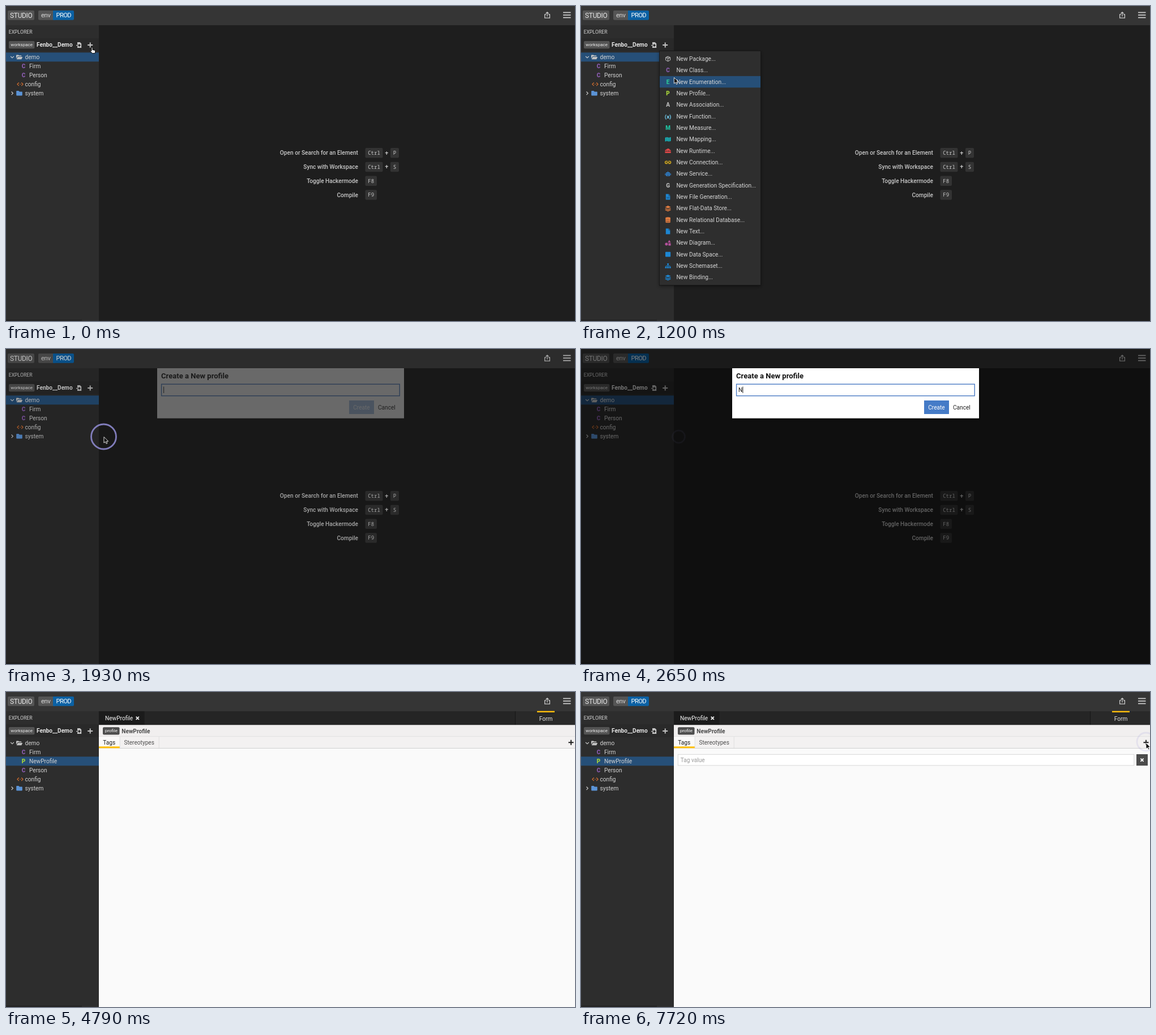
Animation of 1005 by 557 pixels, one loop 8000 ms. Source, as an HTML page:

```html
<!DOCTYPE html>
<html lang="en">
<head>
<meta charset="utf-8">
<title>Create a profile</title>
<style>
html, body { margin: 0; width: 100%; height: 100%; overflow: hidden; background: #1e1e1e; }
svg { display: block; width: 100vw; height: 100vh; }
text { font-family: Roboto, sans-serif; white-space: pre; }
.mono { font-family: "Noto Sans Mono", "DejaVu Sans Mono", monospace; }
</style>
</head>
<body>
<svg id="stage" viewBox="0 0 1005 557"></svg>
<script>
const LOOP = 8000, STEP = 80, SIZE = 10.15, SELECTED = '#264f78';

// Markup helpers
const rect = (x, y, w, h, fill, more = '') =>
  `<rect x="${x}" y="${y}" width="${w}" height="${h}" fill="${fill}" ${more}/>`;
const text = (s, x, y, fill, size = SIZE, weight = 400, more = '') =>
  `<text x="${x}" y="${y}" fill="${fill}" font-size="${size}" font-weight="${weight}" ${more}>${s}</text>`;
const path = (d, fill, more = '') => `<path d="${d}" fill="${fill}" ${more}/>`;
const line = (d, color, width = 1.2, more = '') =>
  `<path d="${d}" fill="none" stroke="${color}" stroke-width="${width}" ${more}/>`;
const group = (id, body, more = '') => `<g id="${id}" ${more}>${body}</g>`;
const place = (x, y, body) => `<g transform="translate(${x} ${y})">${body}</g>`;
const MIDDLE = 'text-anchor="middle"', END = 'text-anchor="end"', ROUND = 'rx="2"';

// Icons, drawn around 0,0
const letter = (s, size = 10) => c => text(s, 0, 3.6, c, size, 900, MIDDLE);
const cross = c => line('M-2.6-2.6L2.6 2.6M2.6-2.6L-2.6 2.6', c, 1.8);
const plus = c => line('M-4.5 0H4.5M0-4.5V4.5', c, 1.9);
const folder = c => path('M-5.3-3.4Q-5.3-4.2-4.5-4.2H-1L.3-2.9H4.5Q5.3-2.9 5.3-2.1V3.3Q5.3 4.1 4.5 4.1H-4.5Q-5.3 4.1-5.3 3.3Z', c);
const openFolder = c =>
  path('M-5.5 2.6V-3Q-5.5-3.9-4.7-3.9H-1.6L-.4-2.7H3.2Q4-2.7 4-1.2H-3Z', c) +
  path('M-2.7-.4H5.8L3.8 3.9H-4.8Z', c);
const tags = c => line('M-2.2-2.8L-5 0L-2.2 2.8M2.2-2.8L5 0L2.2 2.8M-1 0H-.2M.6 0H1.4', c, 1.2);
const cube = c => line('M0-4.4L4-2.3V2.3L0 4.4L-4 2.3V-2.3ZM-4-2.3L0-.2L4-2.3M0-.2V4.4M-2-3.4L2-1.3', c, 1);
const map = c => path('M-5-3L-2-4V3L-5 4ZM-1.4-4L1.4-3V4L-1.4 3ZM2-3L5-4V3L2 4Z', c);
const toolbox = c => path('M-5.2 0Q-5-2.4-2.6-2.6Q-1.6-4.4.6-4.2Q3-4 3.2-2Q5.2-1.6 5.2 0V.4H2V-.3H.6V.4H-2V-.3H-3V.4H-5.2ZM-5.2 1.2H5.2V4H-5.2Z', c);
const link = c =>
  line('M-.8-2.1H-2.9A2.1 2.1 0 0 0-2.9 2.1H-.8M.8-2.1H2.9A2.1 2.1 0 0 1 2.9 2.1H.8M-2.4 0H2.4', c, 1.4);
const robot = c => rect(-3.6, -2.6, 7.2, 6.6, c, 'rx="1.4"') + rect(-5.2, -.6, 1, 3, c) + rect(4.2, -.6, 1, 3, c) +
  rect(-.5, -4.4, 1, 2, c) + rect(-2.3, -.9, 1.5, 1.5, '#2d2d2d') + rect(.8, -.9, 1.5, 1.5, '#2d2d2d') + rect(-2, 2, 4, .8, '#2d2d2d');
const file = c => path('M-3.8-5H1.2V-2H3.8V5H-3.8ZM1.9-5L3.8-2.8H1.9Z', c);
const codeFile = c => file(c) + line('M-1.6 0V3M0 1V3M1.6-.6V3', '#20415c', .8);
const layers = c => path('M0-4.7L5-2.4L0-.1L-5-2.4Z', c) +
  line('M-4.8 .1L0 2.2L4.8 .1M-4.8 2.5L0 4.6L4.8 2.5', c, 1.3);
const database = c => path('M-4.4-3.3A4.4 1.7 0 0 1 4.4-3.3V-2A4.4 1.5 0 0 1-4.4-2ZM-4.4-.8Q0 1.2 4.4-.8V1A4.4 1.5 0 0 1-4.4 1ZM-4.4 2.3Q0 4.2 4.4 2.3V3.5A4.4 1.7 0 0 1-4.4 3.5Z', c);
const shapes = c => path('M2.3-5L5-.6H-.4Z', c) + `<circle cx="-2.7" cy="2.2" r="2.5" fill="${c}"/>` + rect(.8, .6, 4.2, 4.2, c);
const square = c => rect(-4.6, -4.4, 9.2, 8.8, c, 'rx="1"');
const sitemap = c => rect(-1.4, -4.4, 2.8, 2.8, c) + [-5, -1.4, 2.2].map(x => rect(x, 1.4, 2.8, 2.8, c)).join('') +
  line('M0-2V1.6M-3.6 1.6V0H3.6V1.6', c, .9);

const MENU = [
  ['Package', cube, '#c0c0c0'], ['Class', letter('C'), '#8b5cb0'], ['Enumeration', letter('E'), '#2cc295'],
  ['Profile', letter('P'), '#a8d53a'], ['Association', letter('A'), '#b8b8b8'], ['Function', letter('(x)', 9.6), '#6fc5e6'],
  ['Measure', letter('M'), '#1fc4a2'], ['Mapping', map, '#18b0b8'], ['Runtime', toolbox, '#dc4747'],
  ['Connection', link, '#e0b31c'], ['Service', robot, '#2f86d8'], ['Generation Specification', letter('G'), '#b8b8b8'],
  ['File Generation', codeFile, '#1d86d2'], ['Flat-Data Store', layers, '#e07c40'], ['Relational Database', database, '#e07c40'],
  ['Text', file, '#1d86d2'], ['Diagram', shapes, '#b4519b'], ['Data Space', square, '#1d86d2'],
  ['Schemaset', sitemap, '#1d86d2'], ['Binding', layers, '#1d86d2']
];
const GAP = 20.34, menuY = i => 93.4 + i * GAP;

// Explorer tree
const CLASS = [letter('C'), '#8b5cb0'], PROFILE = [letter('P'), '#a8d53a'];
function tree(names, selected) {
  const config = names.length + 1, rowY = i => 90.3 + i * 16;
  const label = (s, x, i) => text(s, x, rowY(i) + 3.7, '#d3d3d3');
  return rect(0, rowY(selected) - 8, 164, 16, SELECTED) +
    place(11, rowY(0), line('M-2.8-1.3L0 1.5L2.8-1.3', '#d3d3d3', 1.1)) +
    place(23.5, rowY(0), openFolder('#c3c3c3')) + label('demo', 33.5, 0) +
    names.map(([name, [icon, color]], i) => place(31, rowY(i + 1), icon(color)) + label(name, 41, i + 1)).join('') +
    place(25, rowY(config), tags('#d8702f')) + label('config', 33.5, config) +
    place(11, rowY(config + 1), line('M-1.4-2.8L1.4 0L-1.4 2.8', '#d3d3d3', 1.1)) +
    place(23.5, rowY(config + 1), folder('#5b93d6')) + label('system', 33.5, config + 1);
}

const header = rect(0, 0, 1005, 34, '#353535') +
  rect(3, 8, 47, 16.7, '#555', ROUND) + text('STUDIO', 7, 20.6, '#e6e6e6', 12, 400, 'letter-spacing="-.33"') +
  rect(57, 8, 30, 16.7, '#555', ROUND) + rect(83, 8, 37, 16.7, '#0b61a4', ROUND) + rect(83, 8, 4, 16.7, '#0b61a4') +
  text('env', 62, 20, '#d8d8d8', 11.2, 400, 'letter-spacing="-.35"') +
  text('PROD', 88.5, 20, '#fff', 11.2, 400, 'letter-spacing="-.65"') +
  place(956, 16, line('M-2.2-1H-4.4V5.2H4.4V-1H2.2M0 2.5V-5M-2.6-2.6L0-5.2L2.6-2.6', '#c9c9c9', 1.3)) +
  [11.5, 16, 20.5].map(y => rect(984, y - .9, 13.5, 1.8, '#c9c9c9')).join('');

const sidebar = rect(0, 34, 164, 523, '#2d2d2d') + rect(0, 57.5, 164, 22, '#292929') +
  text('EXPLORER', 4.7, 49.2, '#d3d3d3', 8.7) +
  rect(5, 62, 45.5, 13.3, '#545454', ROUND) + text('workspace', 8.2, 71.2, '#ececec', 8) +
  text('Fenbo__Demo', 54, 72.4, '#e4e4e4', SIZE, 700) +
  place(129, 69, path('M-3-5H1.6L4.2-2.4V5H-3V2H0V3.4L3 .6L0-2.2V-.7H-3Z', '#c4c4c4') + rect(-5, -.1, 4, 1.4, '#c4c4c4')) +
  place(148.7, 69, plus('#c4c4c4')) + rect(0, 554.6, 134, 2.4, '#222');

const key = (s, x, y, w) => rect(x, y - 8.8, w, 17.4, '#333', ROUND) + text(s, x + w / 2, y + 3.3, '#c8c8c8', 9, 400, `class="mono" ${MIDDLE}`);
const shortcuts = [['Open or Search for an Element', 'P'], ['Sync with Workspace', 'S'], ['Toggle Hackermode', 0, 'F8'], ['Compile', 0, 'F9']]
  .map(([name, ch, single], i) => {
    const y = 259.8 + i * 24.75;
    return text(name, 622, y + 3.6, '#c8c8c8', SIZE, 500, END) + (single ? key(single, 634.5, y, 20.5)
      : key('Ctrl', 634.5, y, 31) + text('+', 672.2, y + 3.8, '#c8c8c8', 11, 500, MIDDLE) + key(ch, 679, y, 15));
  }).join('');

const menu = rect(138.5, 79.5, 179, 414.3, '#2d2d2d', 'stroke="#191919" stroke-width=".8" filter="url(#shade)"') +
  rect(139, 0, 178, GAP, SELECTED, 'id="hover"') +
  MENU.map(([name, icon, color], i) => place(153.6, menuY(i), icon(color)) + text(`New ${name}...`, 168.4, menuY(i) + 3.6, '#d6d6d6')).join('');

const editor = rect(164, 34, 841, 24.5, '#252525') + rect(164, 34, 80.5, 24.5, '#1b1b1b') +
  text('NewProfile', 175, 49.8, '#f2f2f2') + place(232.3, 46.2, cross('#f2f2f2')) +
  rect(899, 34, 1, 24.5, '#161616') + rect(900, 34, 105, 24.5, '#292929') +
  rect(938, 33.6, 31, 2.4, '#ffbf0a') + text('Form', 953.5, 51, '#e0e0e0', SIZE, 400, MIDDLE) +
  rect(164, 58.5, 841, 498.5, '#fafafa') + rect(164, 58.5, 841, 20.5, '#f1efef') +
  rect(171, 62.2, 29.5, 13.2, '#4d4d4d', ROUND) + text('profile', 185.8, 71.3, '#fff', 8, 400, MIDDLE) +
  text('NewProfile', 204.3, 72.5, '#4c4c4c', SIZE, 700) +
  rect(164, 78.5, 841, 21, '#f3f1f1') + rect(164, 78.3, 841, .8, '#ddd') + rect(164, 99, 841, 1, '#cfcfcf') +
  rect(164, 79, 37, 20.4, '#faf9f9') + rect(164, 96.3, 37, 3, '#ffbf0a') +
  rect(200.7, 79, .8, 20, '#dadada') + rect(269.8, 79, .8, 20, '#dadada') +
  text('Tags', 171.3, 92.8, '#1c1c1c') + text('Stereotypes', 208.4, 92.8, '#4f4f4f') + place(998, 89.2, plus('#1c1c1c')) +
  group('tag', rect(171.3, 110.3, 805.5, 19.6, '#fff', 'stroke="#d4d4d4" stroke-width=".9"') +
    text('Tag value', 175.8, 123.8, '#9a9a9a') + rect(981, 110, 20, 20.2, '#4b4b4b') + place(991, 120.2, cross('#fff')));

const modal = rect(0, 0, 1005, 557, '#000', 'opacity=".5"') +
  rect(267, 34, 436, 88.5, '#fff', 'filter="url(#shade)"') + text('Create a New profile', 274, 52, '#111', 13.05, 700) +
  rect(274.6, 62.2, 420.6, 20.6, '#fff', 'stroke="#4a7bc4" stroke-width="1.4"') +
  text('', 278, 76, '#111', SIZE, 400, 'id="typed"') + rect(0, 66.5, .9, 11.5, '#111', 'id="caret"') +
  group('create', rect(606, 91, 44, 24, '#457bc7') + text('Create', 628, 106.6, '#fff', SIZE, 400, MIDDLE)) +
  text('Cancel', 657, 106.6, '#222');

const cursor =
  group('arrow', path('M0 0V10.6L2.5 8.3L4.2 12L5.9 11.2L4.3 7.7H7.6Z', '#000', 'stroke="#fff" stroke-width=".9"')) +
  group('hand', path('M0 1.2C0-.4 2-.4 2 1.2V4.4L5.6 5.2Q6.9 5.6 6.8 7L6.2 10.6H1.5L-1.8 7.2C-2.4 6.3-1.5 5.5-.8 6L0 6.6Z', '#fff', 'stroke="#000" stroke-width=".9"'));

document.getElementById('stage').innerHTML =
  '<defs><filter id="shade" x="-20%" y="-20%" width="140%" height="140%"><feDropShadow dx="0" dy="2" stdDeviation="3" flood-opacity=".4"/></filter></defs>' +
  rect(0, 0, 1005, 557, '#1e1e1e') + header + sidebar + shortcuts +
  group('before', tree([['Firm', CLASS], ['Person', CLASS]], 0)) +
  group('after', tree([['Firm', CLASS], ['NewProfile', PROFILE], ['Person', CLASS]], 2) + editor) +
  group('menu', menu) + group('modal', modal) +
  '<circle id="ring" fill="none" stroke="#8c88cc" stroke-width="2.8"/>' + group('cursor', cursor);

// Timeline: [time, values...]
const MOVE = [
  [0, 151, 73], [480, 151, 73], [560, 152, 72], [720, 153.5, 71], [1360, 168, 145], [1440, 173, 155.5], [2650, 173, 155.5],
  [5950, 208, 189], [6110, 429, 272], [6190, 429, 272], [6270, 690, 160], [6350, 983, 48], [6520, 983, 48], [6600, 985, 55], [6920, 998, 90]
];
const RING = [ // radius, opacity
  [0, 0, 0], [80, 4, .9], [320, 22, .9], [400, 24, .9], [480, 24, .9], [1040, 12, 0],
  [1610, 0, 0], [1690, 4, .9], [1850, 16, .9], [1930, 22, .9], [2010, 24, .9], [2090, 24, .9], [2650, 11, .06], [2730, 10, 0],
  [6680, 0, 0], [6760, 4, .9], [6920, 17, .9], [7000, 17, .9], [7080, 22, .9], [7160, 24, .9], [7240, 24, .9], [7720, 16, .15]
];
const CLICKS = [[0, 149, 68], [1600, 172.5, 155], [6600, 998, 88]];
const TYPING = [[0, ''], [2650, 'N'], [3140, 'Ne'], [3300, 'New'], [3550, 'NewP'], [3800, 'NewPro'],
  [4050, 'NewProf'], [4130, 'NewProfi'], [4210, 'NewProfil'], [4290, 'NewProfile']];

const last = (table, t) => table.findLastIndex(k => k[0] <= t);
function sample(table, t) {
  const i = last(table, t), a = table[i], b = table[i + 1];
  if (!b) return a.slice(1);
  const f = Math.floor((t - a[0]) / STEP) * STEP / (b[0] - a[0]);
  return a.slice(1).map((v, j) => v + (b[j + 1] - v) * f);
}

const $ = id => document.getElementById(id);
const set = (id, attrs) => { for (const k in attrs) $(id).setAttribute(k, attrs[k]); };
const show = (id, on) => { $(id).style.display = on ? '' : 'none'; };

function draw(t) {
  const [x, y] = sample(MOVE, t), [r, opacity] = sample(RING, t);
  const [, cx, cy] = CLICKS[last(CLICKS, t)];
  const open = t >= 320 && t < 1930, made = t >= 4790, word = TYPING[last(TYPING, t)][1];

  show('before', !made);
  show('after', made);
  show('tag', t >= 7080);

  const item = Math.floor((y - menuY(0)) / GAP + .5);
  show('menu', open);
  show('hover', item >= 0);
  set('hover', { y: menuY(item) - GAP / 2 });

  const fade = Math.floor((t - 1930) / STEP + 1) / 3;
  show('modal', t >= 1930 && !made);
  set('modal', { opacity: Math.max(0, Math.min(1, fade)) });
  set('create', { opacity: word ? 1 : .5 });
  if ($('typed').textContent !== word) $('typed').textContent = word;
  set('caret', { x: 278.2 + (word && !made ? $('typed').getComputedTextLength() : 0) });

  set('ring', { cx, cy, r, opacity });
  show('cursor', t < 2650 || t >= 5950);
  set('cursor', { transform: `translate(${x} ${y})` });
  show('hand', t < 1440 && y < 80);
  show('arrow', t >= 1440 || y >= 80);
}

function tick() {
  draw(performance.now() % LOOP);
  requestAnimationFrame(tick);
}
tick();
</script>
</body>
</html>
```
